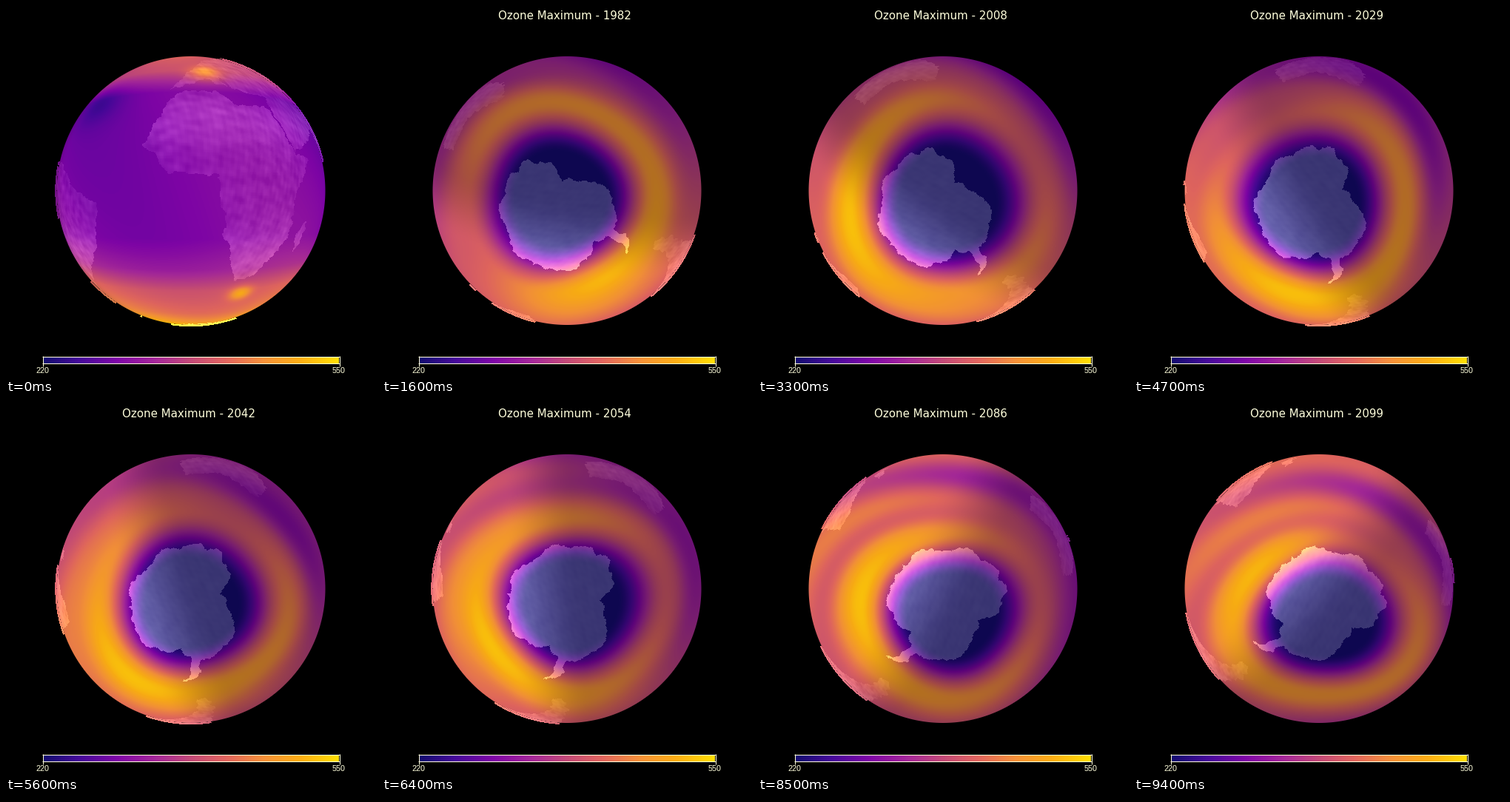
Write a matplotlib script that moves like this. It is 500 px wide and 500 px high and loops after 9.5 s.

```python
import numpy as np
import matplotlib.pyplot as plt
from matplotlib.animation import FuncAnimation
from matplotlib.colors import LinearSegmentedColormap
from matplotlib.path import Path

SIZE, FRAMES, STEP = 500, 95, 100
CX, CY, R = 250, 249.5, 181.5
DIST = 4.0                       # camera distance in globe radii
FOCAL = np.sqrt(DIST ** 2 - 1)
SETTLE, SPIN = 12, 1.55          # length of the glide, degrees per frame
PALE = "#ffffdc"

OZONE = LinearSegmentedColormap.from_list("ozone", [
    (0, "#140a70"), (.12, "#46089a"), (.25, "#8004a8"), (.38, "#a6289a"),
    (.5, "#c44a78"), (.62, "#e2665f"), (.75, "#f69238"), (.87, "#fcae14"),
    (1, "#ffe000")])
LUT = OZONE(np.linspace(0, 1, 512))[:, :3] * 255


def smooth(lo, hi, x):
    t = np.clip((x - lo) / (hi - lo), 0, 1)
    return t * t * (3 - 2 * t)


# ---------------------------------------------------------------- land

# A few corners (longitude, latitude) per coast; noise roughens the rest.
AFRICA = [(-6, 36), (10, 37), (20, 31), (33, 31), (43, 12), (51, 12),
          (40, -4), (40, -15), (35, -24), (27, -33.5), (19, -35), (12, -17),
          (9, 4), (-8, 4.5), (-17, 14.5), (-10, 30)]
MADAGASCAR = [(49, -12), (50, -16), (46, -25), (44, -18)]
SOUTH_AMERICA = [(-75, 11), (-62, 10.5), (-50, 0), (-35, -6), (-40, -22),
                 (-58, -38), (-66, -47), (-65, -55), (-70, -55), (-74, -48),
                 (-70, -20), (-81, -5)]
EURASIA = [(35, 30), (43, 13), (58, 20), (67, 25), (77, 8), (90, 22),
           (104, 2), (122, 38), (170, 65), (30, 70), (8, 60), (-2, 48),
           (-9, 37), (9, 44), (16, 39), (14, 45), (22, 37), (36, 36)]
AUSTRALIA = [(114, -22), (131, -12), (142, -11), (153, -26), (150, -37),
             (131, -31), (116, -35)]
ANTARCTICA = [(-180, -78), (-158, -78), (-135, -74.5), (-75, -72.5),
              (-66, -66.5), (-56.5, -63.2), (-62, -68), (-62, -75),
              (-42, -77.5), (-10, -71), (40, -69), (53, -66.5), (70, -69),
              (95, -66), (140, -66.7), (168, -72), (171, -78), (180, -78),
              (180, -90), (-180, -90)]


def unit(lat, lon):
    lat, lon = np.radians(lat), np.radians(lon)
    return np.array([np.cos(lat) * np.cos(lon),
                     np.cos(lat) * np.sin(lon),
                     np.sin(lat) + 0 * lon])


def ripple(points, scale, seed, count=16):
    """Smooth random texture on the sphere, a sum of plane waves."""
    rng = np.random.default_rng(seed)
    total = 0
    for wave, phase in zip(rng.normal(0, scale, (count, 3)),
                           rng.uniform(0, 2 * np.pi, count)):
        total = total + np.sin(np.tensordot(wave, points, 1) + phase)
    return total / np.sqrt(count)


def land_map(rows=540, cols=1080):
    """Brightness of the ground: 0 for sea, about 1 for ice."""
    lat = np.linspace(-89.9, 89.9, rows)[:, None] + np.zeros((1, cols))
    lon = np.linspace(-180, 180, cols, endpoint=False) + 0 * lat
    p = unit(lat, lon)
    wlat = lat + .6 * ripple(p, 60, 1)
    wlon = lon + .6 * ripple(p, 60, 2) / np.maximum(np.cos(np.radians(lat)), .2)
    spots = np.column_stack([np.clip(wlon, -179.9, 179.9).ravel(),
                             np.clip(wlat, -89.9, 89.9).ravel()])

    def inside(shape):
        return Path(shape + shape[:1]).contains_points(spots).reshape(lat.shape)

    grain = ripple(p, 60, 3)
    ground = np.zeros(lat.shape)
    for shape in (AFRICA, MADAGASCAR, SOUTH_AMERICA, EURASIA, AUSTRALIA):
        ground[inside(shape)] = 1
    desert = np.exp(-((np.abs(lat) - 24) / 10) ** 2)
    ground *= np.maximum(.14 + .26 * desert + .07 * grain, .04)
    ice = inside(ANTARCTICA)
    ground[ice] = (.95 + .03 * grain)[ice]
    return ground


GROUND = land_map()


def ground_at(lat, lon):
    rows, cols = GROUND.shape
    i = np.clip(((lat + 90) / 180 * rows).astype(int), 0, rows - 1)
    return GROUND[i, ((lon + 180) / 360 * cols).astype(int) % cols]


# -------------------------------------------------------------- camera

def polar_view(n):
    return -81.2, 205.6 - SPIN * n


def camera(n):
    """Glide from the equator to the slowly turning polar view."""
    lat, lon = polar_view(n)
    left = 1 - smooth(0, SETTLE, n)
    return lat + 79.7 * left, lon + 154.4 * left


def basis(lat, lon):
    a, b = np.radians([lat, lon])
    east = [-np.sin(b), np.cos(b), 0]
    north = [-np.sin(a) * np.cos(b), -np.sin(a) * np.sin(b), np.cos(a)]
    return np.array([east, north, unit(lat, lon)])


def project(p, lat, lon):
    """Stage position of a globe point; hidden points go to the rim."""
    x, y, z = np.tensordot(basis(lat, lon), p, 1)
    k = FOCAL / (DIST - z)
    x, y = x * k, y * k
    fit = np.where(z < 1 / DIST, 1 / (np.hypot(x, y) + 1e-9), 1)
    return CX + R * x * fit, CY - R * y * fit


LO, HI = 60, 440
gy, gx = np.mgrid[LO:HI, LO:HI] + .5
gx, gy = (gx - CX) / R, (CY - gy) / R
RHO = np.hypot(gx, gy)
alpha = np.arctan(np.minimum(RHO, 1) / FOCAL)
theta = np.arcsin(np.minimum(DIST * np.sin(alpha), 1)) - alpha
VIEW = np.array([np.sin(theta) * gx / RHO, np.sin(theta) * gy / RHO,
                 np.cos(theta)])
DISC = np.clip((1 - RHO) * R + .5, 0, 1)
RIM = (RHO > 1) & (RHO < 1.012)


# --------------------------------------------------------------- ozone

# Collar through time: frame, centre x and y, radii, bright and dull bearing.
COLLAR = np.array([
    (16, 240, 259, 127, 129, 70, 150),
    (33, 255, 262, 132, 132, 165, 330),
    (47, 242, 267, 128, 126, 105, 235),
    (64, 257, 270, 128, 119, 150, 350),
    (76, 263, 278, 116, 118, 160, 390),
    (94, 260, 290, 126, 106, 220, 300)]).T
rng = np.random.default_rng(4)
SWIRLS = [(k, rng.uniform(7, 12), rng.uniform(0, 6.28), rng.uniform(-.1, .1))
          for k in (1, 2, 2, 3)]


def lobe(ang, bearing, sharp=2):
    return np.exp(sharp * (np.cos(ang - np.radians(bearing)) - 1))


def vortex(x, y, n):
    """Low core, bright collar, and a swirling outside warm on the sunny side."""
    cx, cy, rx, ry, bright, dull = (np.interp(n, COLLAR[0], row)
                                    for row in COLLAR[1:])
    dx, dy = x - cx, y - cy
    ang = np.arctan2(dy, dx)
    e = np.hypot(dx / rx, dy / ry) * (1 + .03 * np.sin(3 * ang + .3 * n))
    sunny = 90 + SPIN * (n - 16)
    crest = .76 + .17 * lobe(ang, bright) - .2 * lobe(ang, dull)
    swirl = sum(np.sin(k * ang + m * e + phase + drift * n)
                for k, m, phase, drift in SWIRLS)
    far = .46 + .15 * np.cos(ang - np.radians(sunny)) + .03 * swirl
    outside = far + (crest - far) * np.exp(-((e - 1) / .26) ** 2)
    return np.where(e < 1, crest * smooth(.47, 1, e), outside)


def bands(lat, lon):
    """Calm tropics between ozone-rich middle latitudes."""
    level = np.interp(lat, [-72, -55, -40, -30, -18, 25, 36, 50, 75],
                      [.9, .68, .58, .38, .27, .24, .24, .5, .6])
    level = level + .04 * np.sin(np.radians(3 * lon + 2 * lat))
    for at, up, size, lift in ((25, -42, 6, .27), (8, 48, 9, .25),
                               (-45, 33, 14, -.1)):
        level = level + lift * np.exp(-((lon - at) / size) ** 2
                                      - ((lat - up) / size * 1.6) ** 2)
    return level


# -------------------------------------------------------------- picture

SUN = unit(0, 12)
ICE = np.array([92, 98, 72])


def globe(n):
    p = np.tensordot(basis(*camera(n)).T, VIEW, 1)
    lat = np.degrees(np.arcsin(np.clip(p[2], -1, 1)))
    lon = np.degrees(np.arctan2(p[1], p[0]))
    arrived = smooth(0, SETTLE, n)
    level = vortex(*project(p, *polar_view(n)), n) * arrived \
        + bands(lat, lon) * (1 - arrived)
    day = smooth(-.1, .35, np.tensordot(SUN, p, 1))
    rgb = LUT[(np.clip(level, 0, 1) * 511).astype(int)]
    rgb = rgb * (.72 + .26 * day)[..., None]
    land = ground_at(lat, lon)
    rgb = rgb + (land * (.5 + .5 * day))[..., None] * ICE
    cover = np.where(RIM & (land > 0), 1, DISC)
    return np.clip(rgb * cover[..., None], 0, 255).astype(np.uint8)


fig = plt.figure(figsize=(5, 5), dpi=100, facecolor="black")
ax = fig.add_axes([0, 0, 1, 1])
picture = ax.imshow(np.zeros((HI - LO, HI - LO, 3), np.uint8),
                    extent=(LO, HI, HI, LO), interpolation="nearest")
ax.imshow(np.linspace(0, 1, 400)[None], cmap=OZONE, aspect="auto",
          extent=(50, 450, 483, 474), interpolation="nearest")
ax.set(xlim=(0, SIZE), ylim=(SIZE, 0))
ax.axis("off")
for y in (473.5, 482.5):
    ax.plot([49, 451], [y, y], color=PALE, lw=.72, solid_capstyle="butt")
for x, label in ((49.5, "220"), (450.5, "550")):
    ax.plot([x, x], [473, 487], color=PALE, lw=.72, solid_capstyle="butt")
    ax.text(x - .5, 496, label, color=PALE, family="Liberation Sans",
            size=10.8 * .72, ha="center", va="baseline")
title = ax.text(157, 18, "", color=PALE, family="DejaVu Sans",
                size=15 * .72, ha="left", va="baseline")


def draw(n):
    picture.set_data(globe(n))
    year = int(np.ceil(1958 + 1.5 * n))
    title.set_text(f"Ozone Maximum - {year}" if n else "")
    return picture, title


anim = FuncAnimation(fig, draw, frames=FRAMES, interval=STEP, repeat=True,
                     repeat_delay=0, blit=False)
plt.show()
```
